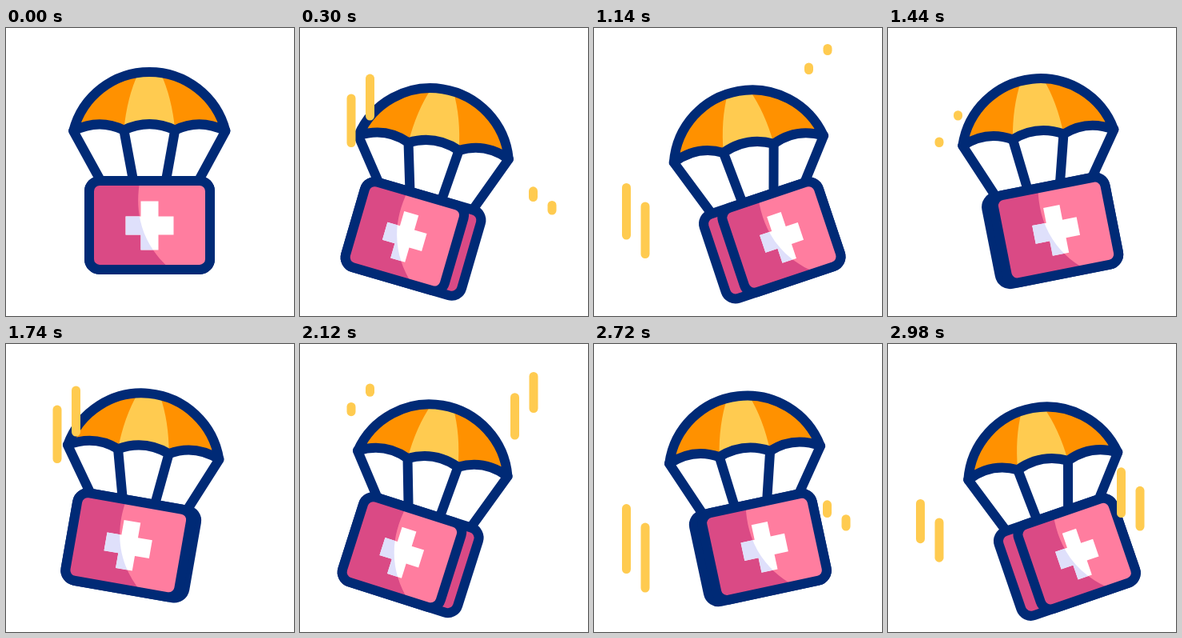
Write an HTML page that moves like this. It is 360x360 px and loops after 3 s.

```html
<!DOCTYPE html>
<html lang="en">
<head>
<meta charset="utf-8">
<title>Medical airdrop</title>
<style>
  html, body { margin: 0; width: 100%; height: 100%; overflow: hidden; background: #fff; }
  svg { display: block; width: 100vw; height: 100vh; }
  .line { fill: none; stroke: #002a76; stroke-width: 12; stroke-linecap: round; stroke-linejoin: round; }
  .streak { stroke: #ffcb50; stroke-width: 11; stroke-linecap: round; }
</style>
</head>
<body>
<svg viewBox="0 0 360 360">
  <defs>
    <path id="shade" d="M-12 -56 C-20 -11 -7 27 27 56 H-76 V-56Z"/>
    <path id="cross" d="M-11 -30 H11 V-11 H30 V12 H11 V31 H-11 V12 H-30 V-11 H-11Z"/>
    <path id="dome" d="M-95 0 A98.1 98.1 0 0 1 95 0 Q63 -16 32 -1 Q0 -16 -32 -1 Q-63 -16 -95 0Z"/>
    <rect id="frame" y="-55.5" height="111" rx="13"/>
    <clipPath id="frameClip"><use href="#frame"/></clipPath>
    <clipPath id="crossClip"><use href="#cross" class="squash"/></clipPath>
  </defs>

  <g id="cords" class="line"></g>

  <g id="canopy">
    <use href="#dome" fill="#ff9100"/>
    <path fill="#ffcb50" d="M-32 -1 Q-28 -42 -14 -72 H14 Q28 -42 32 -1 Q0 -16 -32 -1Z"/>
    <use href="#dome" class="line"/>
  </g>

  <g id="box">
    <rect class="line" x="-75.5" y="-55.5" width="151" height="111" rx="13" style="fill:#da4a85"/>
    <g id="face">
      <use href="#frame" fill="#ff7d9f"/>
      <g clip-path="url(#frameClip)"><use href="#shade" fill="#da4a85"/></g>
      <use href="#cross" class="squash" fill="#fff"/>
      <g clip-path="url(#crossClip)"><use href="#shade" fill="#dfe0fb"/></g>
      <use href="#frame" class="line"/>
    </g>
  </g>

  <g id="streaks"></g>
</svg>
<script>
const LOOP = 3000, STEP = 20, TRIM = 400, GAP = 23.5;
const EXTREMES = [0, 400, 1200, 2000, 3000];

// pairs of speed lines; dir says whether the second one sits lower or higher
const PAIRS = [
  { x: 64, top: 78.5, dir: -1, lengths: [65, 55], again: 1400 },
  { x: 291.5, top: 159.5, dir: 1, lengths: [52, 45], again: 2600 },
  { x: 268.5, top: 49, dir: -1, lengths: [65, 55], again: 1860 },
  { x: 40.5, top: 199.5, dir: 1, lengths: [82, 82], again: 2390 }
];

const $ = id => document.getElementById(id);
const clamp = p => Math.min(1, Math.max(0, p));
const ease = p => (1 - Math.cos(Math.PI * clamp(p))) / 2;
const toTransform = p => `translate(${p.x} ${p.y}) rotate(${p.r})`;

function addLine(parent, cls) {
  const el = document.createElementNS('http://www.w3.org/2000/svg', 'line');
  el.setAttribute('class', cls);
  return parent.appendChild(el);
}

function set(el, attrs) {
  for (const k in attrs) el.setAttribute(k, attrs[k]);
}

function place(p, x, y) {
  const a = p.r * Math.PI / 180, c = Math.cos(a), s = Math.sin(a);
  return [p.x + x * c - y * s, p.y + x * s + y * c];
}

// -1 is far left, 1 far right; the first move starts from rest in the middle
function swingAt(t) {
  const i = EXTREMES.findIndex(e => t < e);
  const from = EXTREMES[i - 1], p = ease((t - from) / (EXTREMES[i] - from));
  const side = i % 2 ? -1 : 1;
  return i === 1 ? side * p : side * (2 * p - 1);
}

const cords = [-1.5, -0.5, 0.5, 1.5].map(k => ({ k, el: addLine($('cords'), 'line') }));

const streaks = PAIRS.flatMap(({ x, top, dir, lengths, again }, i) =>
  lengths.map((length, n) => ({
    x: x + n * GAP, top: top + n * dir * GAP, length,
    starts: [200 * i, again], el: addLine($('streaks'), 'streak')
  })));

function drawCrate(t) {
  const swing = swingAt(t);
  const dip = t < EXTREMES[1] ? -swing : swing * swing;
  const canopy = { x: 179.3 + 14.5 * swing, y: 128.6 + 24 * dip, r: -10.4 * swing };
  const box = { x: 179.5 + 44.5 * swing, y: 246.4 + 20 * dip, r: -19 * swing };
  const inset = 13 * dip, half = 75.5 - inset;

  set($('canopy'), { transform: toTransform(canopy) });
  set($('box'), { transform: toTransform(box) });
  set($('face'), { transform: `translate(${Math.sign(swing) * inset} 0)` });
  set($('frame'), { x: -half, width: 2 * half });
  for (const el of document.querySelectorAll('.squash')) {
    set(el, { transform: `scale(${half / 75.5} 1)` });
  }
  for (const { k, el } of cords) {
    const [x1, y1] = place(canopy, 63.5 * k, 0), [x2, y2] = place(box, 41 * k, -56);
    set(el, { x1, y1, x2, y2 });
  }
}

function drawStreaks(t) {
  for (const { x, top, length, starts, el } of streaks) {
    const start = starts.find(s => t > s && t < s + 2 * TRIM);
    const on = start !== undefined, age = on ? (t - start) / TRIM : 0;
    const at = p => top + length * (1 - ease(p));
    set(el, {
      x1: x, x2: x, y1: at(age - 1), y2: at(age) - 0.01,
      visibility: on ? 'visible' : 'hidden'
    });
  }
}

function render(t) {
  drawCrate(t);
  drawStreaks(t);
}

function tick() {
  render(Math.floor(performance.now() % LOOP / STEP) * STEP);
  requestAnimationFrame(tick);
}
render(0);
requestAnimationFrame(tick);
</script>
</body>
</html>
```
